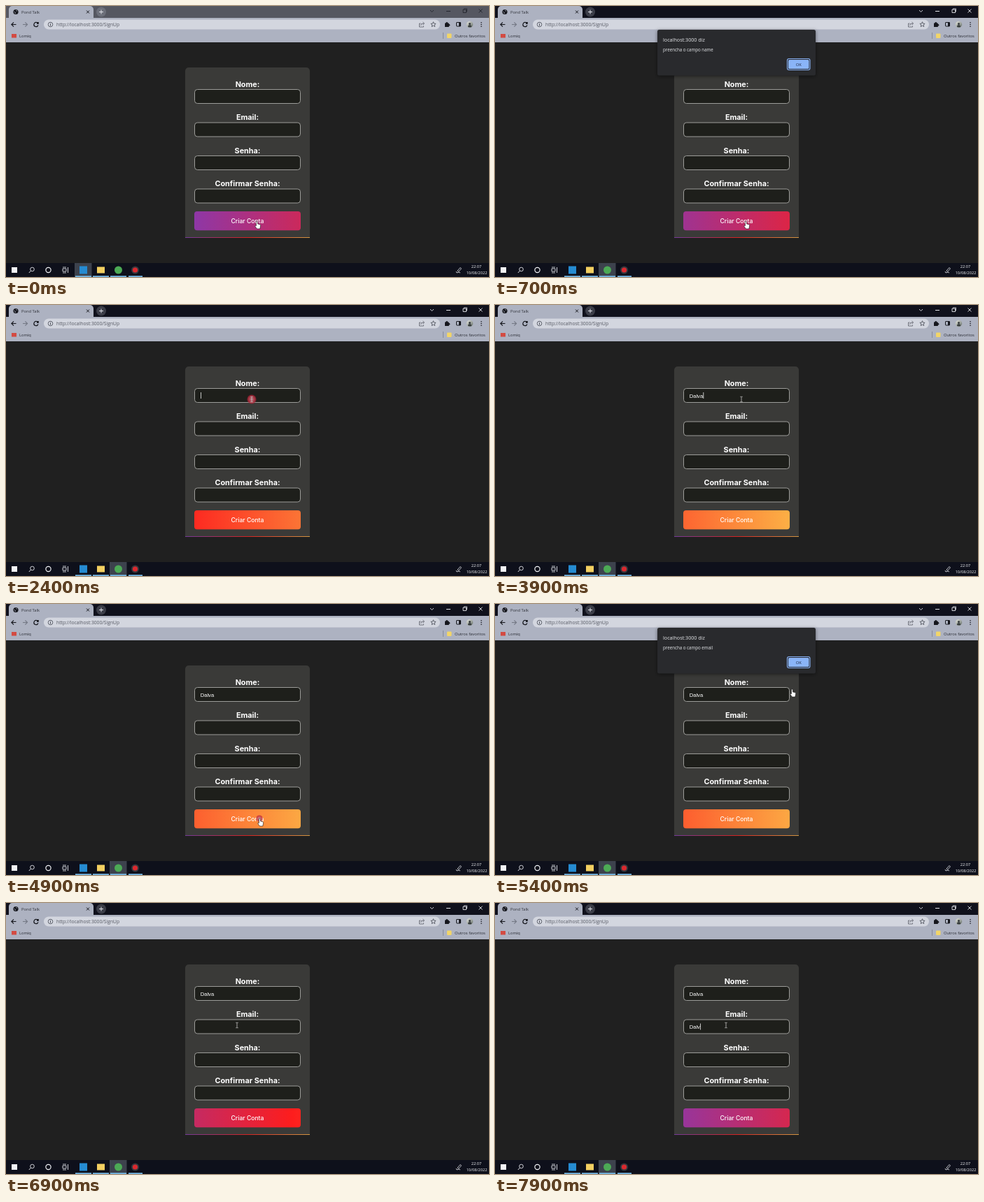
An HTML page with a canvas for the animation above (8 s loop, 690 px wide and 388 px high).

```html
<!DOCTYPE html>
<html lang="pt">
<head>
<meta charset="utf-8">
<title>Sign up</title>
<style>
  html, body { margin: 0; width: 100%; height: 100%; overflow: hidden; background: #202020; }
  canvas { display: block; width: 690px; height: 388px; }
</style>
</head>
<body>
<canvas id="stage"></canvas>
<script>
const W = 690, H = 388, LOOP = 8000, STEP = 100;
const canvas = document.getElementById('stage');
const ctx = canvas.getContext('2d');
const ratio = window.devicePixelRatio || 1;
canvas.width = W * ratio;
canvas.height = H * ratio;

const UI = '"Open Sans", "Noto Sans", sans-serif';
const GEO = 'Inter, Roboto, sans-serif';
const FIELD = '"Liberation Sans", Arial, sans-serif';
const INK = '#15161c';
const NAME = 'Dalva';
const fieldTops = [119.5, 167, 214.5, 262];
const labels = ['Nome:', 'Email:', 'Senha:', 'Confirmar Senha:'];
const nameKeys = [2800, 3000, 3300, 3500, 3700];
const mailKeys = [7300, 7500, 7700, 7900];
const clicks = [100, 1750, 2310, 4850, 5950, 7000];
const dialogs = [
  { from: 600, to: 1900, word: 'name' },
  { from: 5100, to: 6050, word: 'email' }
];

// [time, x, y] of the pointer's hot spot
const path = [
  [0, 358, 308], [900, 358, 308], [1500, 441, 78], [1700, 442, 76], [1900, 442, 76],
  [2250, 351, 135], [2700, 351, 135], [2900, 352, 135], [4200, 352, 135],
  [4800, 362, 307], [5100, 362, 307], [5400, 424, 122], [5700, 434, 91],
  [6300, 434, 91], [6900, 330, 175], [8000, 330, 175]
];

// [time, offset] of the button's gradient, held while a dialog is open
const slide = [
  [0, .045], [600, .115], [1899, .115], [1900, .37], [2400, .545], [2900, .66],
  [3400, .715], [3900, .745], [4200, .745], [5000, .72], [6049, .72],
  [6050, .52], [6100, .51], [6700, .32], [7300, .17], [7900, .085], [8000, .075]
];

function sample(keys, t, ease = k => k) {
  let i = 1;
  while (i < keys.length - 1 && keys[i][0] < t) i++;
  const a = keys[i - 1], b = keys[i];
  const k = ease(Math.min(1, Math.max(0, (t - a[0]) / (b[0] - a[0]))));
  return a.slice(1).map((v, n) => v + (b[n + 1] - v) * k);
}
const smooth = k => k * k * (3 - 2 * k);

function rect(x, y, w, h, fill) {
  ctx.fillStyle = fill;
  ctx.fillRect(x, y, w, h);
}
function box(x, y, w, h, r, fill, stroke, width = 1) {
  ctx.beginPath();
  ctx.roundRect(x, y, w, h, r);
  if (fill) { ctx.fillStyle = fill; ctx.fill(); }
  if (stroke) { ctx.strokeStyle = stroke; ctx.lineWidth = width; ctx.stroke(); }
}
function disc(x, y, r, fill, stroke, width = 1) {
  box(x - r, y - r, 2 * r, 2 * r, r, fill, stroke, width);
}
function line(points, color, width = 1, closed = false, fill = null) {
  ctx.beginPath();
  for (let i = 0; i < points.length; i += 2) ctx.lineTo(points[i], points[i + 1]);
  if (closed) ctx.closePath();
  if (fill) { ctx.fillStyle = fill; ctx.fill(); }
  ctx.strokeStyle = color;
  ctx.lineWidth = width;
  ctx.stroke();
}
function text(str, x, y, font, color, align = 'left') {
  ctx.font = font;
  ctx.fillStyle = color;
  ctx.textAlign = align;
  ctx.fillText(str, x, y);
}
function at(x, y, draw) {
  ctx.save();
  ctx.translate(x, y);
  draw();
  ctx.restore();
}
function blend(x0, x1, from = 0, to = 1) {
  const g = ctx.createLinearGradient(x0, 0, x1, 0);
  const span = to - from;
  const stops = [[0, [131, 58, 180]], [.5, [253, 29, 29]], [1, [252, 176, 69]]];
  const mix = p => sample(stops.map(([k, c]) => [k, ...c]), p).map(Math.round);
  const put = p => g.addColorStop((p - from) / span, `rgb(${mix(p)})`);
  put(from);
  if (from < .5 && to > .5) put(.5);
  put(to);
  return g;
}

function drawTabs(active) {
  rect(0, 0, W, 18, active ? '#10111c' : '#555761');
  box(4, 0, 121, 20, [5, 5, 0, 0], '#adb2c1');
  disc(14, 8.5, 3.6, INK);
  line([11.5, 8, 13.5, 9.5, 13, 11], '#adb2c1', .8);
  line([14, 6, 16, 7.5], '#adb2c1', .8);
  text('Pond Talk', 22, 10.6, '5.8px ' + UI, '#30323a');
  line([115, 6.5, 119, 10.5], INK);
  line([119, 6.5, 115, 10.5], INK);
  disc(136, 8.5, 7, active ? '#3b3d48' : '#6c6f7a');
  line([133, 8.5, 139, 8.5], '#dfe1e8');
  line([136, 5.5, 136, 11.5], '#dfe1e8');
  const c = active ? '#e4e5ea' : '#24262e';
  line([606, 6, 608.5, 8.5, 611, 6], c, .9);
  line([629, 7.5, 635, 7.5], c);
  box(653, 5, 4.5, 4.5, 0, null, c, .9);
  line([654.5, 5, 654.5, 3.8, 658.5, 3.8, 658.5, 8, 657.5, 8], c, .7);
  line([675.5, 4.5, 680.5, 9.5], c, .9);
  line([680.5, 4.5, 675.5, 9.5], c, .9);
}

function drawToolbar() {
  rect(0, 17, W, 35, '#adb2c1');
  line([14.5, 26.5, 8, 26.5], INK, 1.1);
  line([11, 23.3, 7.8, 26.5, 11, 29.7], INK, 1.1);
  line([24, 26.5, 30, 26.5], '#747885', 1.1);
  line([27.4, 23.3, 30.6, 26.5, 27.4, 29.7], '#747885', 1.1);
  ctx.beginPath();
  ctx.arc(43, 26.5, 3.1, .3, 5.6);
  ctx.strokeStyle = INK;
  ctx.lineWidth = 1.2;
  ctx.stroke();
  rect(44, 23, 2.8, 2.8, INK);

  box(54, 19.5, 566, 14, 7, '#d3d6df');
  disc(63.5, 26.5, 3.3, null, '#454852', .8);
  rect(63, 26, 1, 2.4, '#454852');
  rect(63, 24.5, 1, .9, '#454852');
  text('http://localhost:3000/SignUp', 72, 29, '6.75px ' + UI, '#555862');
  line([592.5, 25, 590.5, 25, 590.5, 30, 596.5, 30, 596.5, 28.5], '#565963', .8);
  line([592.5, 28, 593.5, 25.5, 597, 25], '#565963', .8);
  line([595.5, 23, 597.7, 25, 595.5, 27], '#565963', .8);
  at(610.5, 26.5, () => {
    const star = [];
    for (let i = 0; i < 10; i++) {
      const r = i % 2 ? 1.7 : 3.8, a = i * Math.PI / 5 - Math.PI / 2;
      star.push(r * Math.cos(a), r * Math.sin(a));
    }
    line(star, '#454852', .8, true);
  });
  rect(627, 24.5, 5.8, 5.5, INK);
  disc(629.8, 24.2, 1.3, INK);
  disc(633, 27.3, 1.3, INK);
  box(643.5, 23.5, 6, 5.5, .5, null, INK, 1);
  rect(647, 23.5, 2.5, 5.5, INK);
  const photo = ctx.createLinearGradient(658, 22, 667, 31);
  photo.addColorStop(0, '#e3e4df');
  photo.addColorStop(1, '#66706a');
  disc(662.5, 26.5, 4.7, photo);
  disc(662.5, 25.5, 1.5, '#353a3b');
  box(660, 27.2, 5, 3, [2, 2, 1, 1], '#353a3b');
  for (const y of [23.7, 26.5, 29.3]) disc(679, y, .8, INK);

  rect(8, 40, 7, 5.5, '#d34b42');
  text('Lomiq', 19, 44.7, '5.8px ' + UI, '#292b33');
  rect(624, 38, 1, 9, '#858a99');
  box(630, 39.5, 6.5, 6.5, 1, '#f2d568');
  text('Outros favoritos', 641, 44.7, '5.8px ' + UI, '#292b33');
}

function drawField(i, value, caret) {
  const y = fieldTops[i];
  text(labels[i], 345, y - 4, '700 10.8px ' + GEO, '#fff', 'center');
  box(269.5, y, 151, 20, 4, '#1e1f1b', '#aaaaa6', .9);
  text(value, 277.7, y + 13, '7.6px ' + FIELD, '#fff');
  if (caret) rect(278 + ctx.measureText(value).width, y + 5.5, .8, 9, '#eee');
}

function drawForm(t) {
  const typed = (word, keys) => word.slice(0, keys.filter(k => k <= t).length);
  const nameCaret = t >= 2310 && t < 4200 || t >= 4700 && t < 4850;
  const mailCaret = t >= 7000;
  rect(0, 52, W, 316, '#202020');
  box(256, 88, 178, 244, [5, 5, 0, 0], '#3a3a38');
  drawField(0, typed(NAME, nameKeys), nameCaret);
  drawField(1, typed(NAME.slice(0, 4), mailKeys), mailCaret);
  drawField(2, '', false);
  drawField(3, '', false);
  const [p] = sample(slide, t);
  box(269, 294, 152, 27.3, 4, blend(269, 421, p, p + .25));
  text('Criar Conta', 345, 311, '500 8.6px ' + GEO, '#fff', 'center');
  ctx.globalAlpha = .8;
  rect(256, 331, 178, 1, blend(256, 434));
  ctx.globalAlpha = 1;
}

function drawDialog(word, hover) {
  ctx.save();
  ctx.shadowColor = 'rgba(0,0,0,.5)';
  ctx.shadowBlur = 5 * ratio;
  ctx.shadowOffsetY = 1;
  box(232, 34, 226, 65.5, 2.5, '#292a2d');
  ctx.restore();
  text('localhost:3000 diz', 240, 50.5, '7.2px ' + UI, '#e8eaed');
  text('preencha o campo ' + word, 240, 64.6, '6.2px ' + UI, '#e8eaed');
  box(417.5, 75.5, 32.5, 16, 2.5, '#25262b', '#8ab4f8', 1.1);
  box(419, 77, 29.5, 13, 1.5, hover ? '#7f9fd6' : '#8ab4f8');
  text('OK', 433.7, 85.6, '5.8px ' + UI, '#202b42', 'center');
}

function drawTaskbar(active) {
  rect(0, 368, W, 20, '#0e101b');
  rect(active ? 148 : 98, 368, 24.5, 20, '#3d424d');
  rect(8, 374, 8, 8, '#f2f3f6');
  disc(37.5, 377, 2.8, null, '#e4e5ea', .9);
  line([35.5, 379.2, 32.8, 382], '#e4e5ea', 1);
  disc(60.5, 378, 3.6, null, '#f2f3f6', 1.2);
  box(81, 376, 5, 4, 0, null, '#dfe1e8', .9);
  line([81, 374, 86, 374], '#dfe1e8', .8);
  line([81, 382, 86, 382], '#dfe1e8', .8);
  line([88.5, 374, 88.5, 382], '#dfe1e8', .9);
  rect(105, 372.5, 11, 11, '#258bd2');
  rect(130, 373.5, 11, 9, '#f3cf61');
  disc(160.5, 378, 5.5, '#4caa55');
  disc(184.5, 378, 5.5, '#35383e');
  disc(184.5, 378, 3.6, '#d9292f');
  for (const x of [99, 124, 149, 175]) rect(x, 386.3, x === 175 ? 20 : 23, 1.7, '#76b9e8');
  line([645, 379, 649, 374.5, 650.5, 376, 646.5, 380.5], '#e4e5ea', .8, true);
  line([643, 380, 644, 382, 647, 381, 649, 382], '#e4e5ea', .8);
  text('22:07', 672, 375.3, '5.6px ' + UI, '#f2f3f6', 'center');
  text('10/08/2022', 672.5, 384.2, '5.6px ' + UI, '#f2f3f6', 'center');
}

function drawRipple(t, x, y) {
  for (const start of clicks) {
    const age = t - start;
    if (age < 0 || age > 300) continue;
    const r = Math.min(9.5, 2.5 + age * .047);
    const glow = ctx.createRadialGradient(x, y, 0, x, y, r);
    glow.addColorStop(0, 'rgba(190,150,155,.9)');
    glow.addColorStop(.4, 'rgba(200,85,100,.85)');
    glow.addColorStop(.8, 'rgba(190,40,60,.75)');
    glow.addColorStop(1, 'rgba(170,30,50,.35)');
    ctx.globalAlpha = age > 200 ? .5 : 1;
    disc(x, y, r, glow);
    ctx.globalAlpha = 1;
  }
}

const pointers = {
  arrow() {
    line([0, 0, 0, 8, 1.9, 6.3, 3.2, 9, 4.5, 8.4, 3.3, 5.8, 5.7, 5.7], '#111', .6, true, '#fff');
  },
  hand() {
    ctx.beginPath();
    ctx.moveTo(-.6, .6);
    ctx.quadraticCurveTo(.5, -.6, 1.4, .6);
    ctx.lineTo(1.6, 4);
    ctx.lineTo(5, 4.8);
    ctx.quadraticCurveTo(6, 5.3, 5.6, 7);
    ctx.lineTo(4.8, 11);
    ctx.lineTo(.4, 11);
    ctx.lineTo(-2.4, 7);
    ctx.quadraticCurveTo(-2, 5.6, -.6, 6.8);
    ctx.closePath();
    ctx.fillStyle = '#fff';
    ctx.fill();
    ctx.strokeStyle = '#111';
    ctx.lineWidth = .6;
    ctx.stroke();
  },
  beam() {
    const c = '#c2c2c0';
    line([0, -3.5, 0, 3.5], c, .8);
    line([-1.8, -3.7, 1.8, -3.7], c, .7);
    line([-1.8, 3.7, 1.8, 3.7], c, .7);
  }
};

function pointerKind(x, y, dialog) {
  if (dialog) return y < 99 ? 'arrow' : 'hand';
  if (x < 269 || x > 421) return 'arrow';
  if (y > 294 && y < 321) return 'hand';
  return fieldTops.some(top => y > top && y < top + 20) ? 'beam' : 'arrow';
}

function draw(t) {
  ctx.setTransform(ratio, 0, 0, ratio, 0, 0);
  const active = t >= 200;
  const dialog = dialogs.find(d => t >= d.from && t < d.to);
  const [x, y] = sample(path, t, smooth);
  drawTabs(active);
  drawToolbar();
  drawForm(t);
  if (dialog) drawDialog(dialog.word, x > 418 && y > 74 && y < 92);
  drawTaskbar(active);
  drawRipple(t, x, y);
  at(x, y, pointers[pointerKind(x, y, dialog)]);
}

const begin = performance.now();
function tick() {
  const t = (performance.now() - begin) % LOOP;
  draw(Math.floor(t / STEP) * STEP);
  requestAnimationFrame(tick);
}
tick();
</script>
</body>
</html>
```
